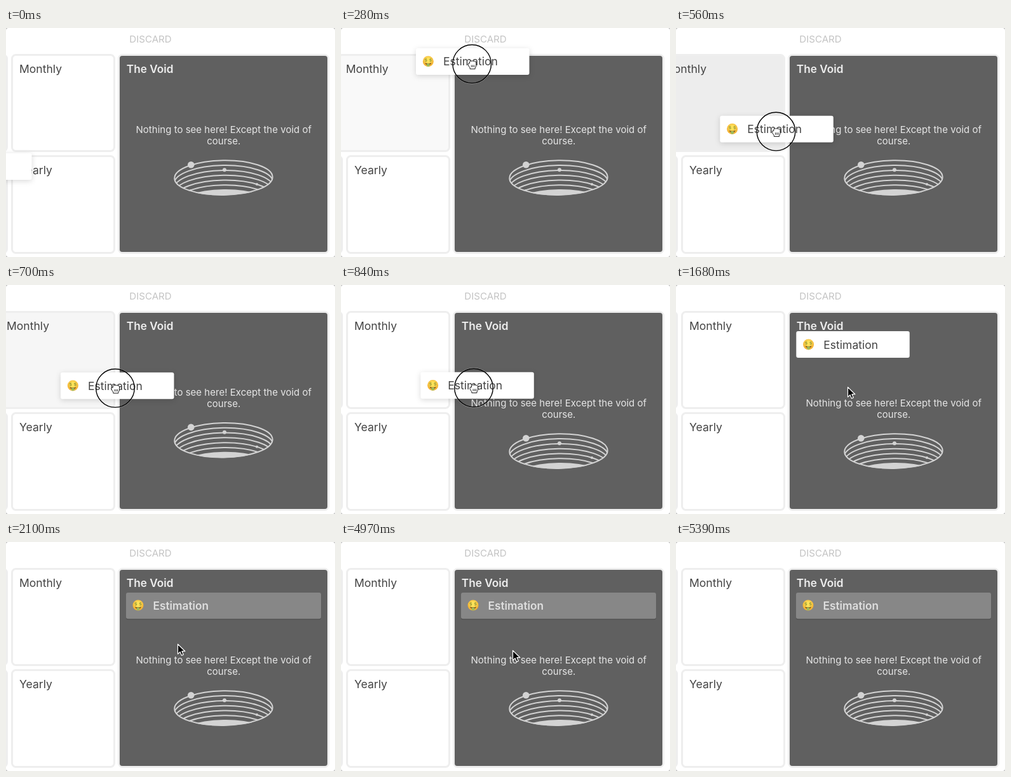
These frames come from a looping animation (518 by 362 pixels, 5.67 s). An HTML page:

```html
<!DOCTYPE html>
<html lang="en">
<head>
<meta charset="utf-8">
<title>Drag to the void</title>
<style>
  html, body { margin: 0; width: 100%; height: 100%; overflow: hidden; background: #bbb; }
  svg { display: block; width: 518px; height: 362px; font: 17.55px Inter, sans-serif; }
  .box { fill: #fff; stroke: #eee; stroke-width: 3; }
  .label { fill: #444; }
  .bold { font-weight: 600; font-size: 17.25px; }
  .rings { fill: none; stroke: #d3d3d3; stroke-width: 2; }
  #card { filter: drop-shadow(0 2px 4px rgba(0, 0, 0, .15)); }
</style>
</head>
<body>
<svg viewBox="0 0 518 362">
  <defs>
    <clipPath id="rim"><ellipse cx="342.5" cy="236" rx="78" ry="28"/></clipPath>
    <radialGradient id="skin" cy=".4">
      <stop offset=".4" stop-color="#fde25a"/><stop offset="1" stop-color="#f3b233"/>
    </radialGradient>
    <g id="face">
      <circle r="8.5" fill="url(#skin)"/>
      <path d="M-2.2-3.8q-2.8-.8-2.8.6t1.4 1 1.4 1.2-2.8.6M5-3.8q-2.8-.8-2.8.6t1.4 1 1.4 1.2-2.8.6"
            fill="none" stroke="#8a8f2c"/>
      <path d="M-5 2.2Q0 4 5 2.2 4 6 0 6T-5 2.2" fill="#8a5a1c"/>
      <path d="M-2.2 3.4h4.4v4q-2.2 1.4-4.4 0z" fill="#9dbb5c"/>
    </g>
  </defs>

  <rect width="518" height="362" rx="4" fill="#fff"/>
  <text x="194.3" y="23" font-size="15.1" fill="#c4c4c4">DISCARD</text>

  <rect class="box" id="left" x="-160" y="42.5" width="161.5" height="152" rx="6"/>
  <rect class="box" x="-160" y="202.5" width="161.5" height="153" rx="6"/>
  <rect class="box" id="monthly" y="42.5" height="152" rx="6"/>
  <text class="label" id="monthlyLabel" y="71">Monthly</text>
  <rect class="box" x="9.5" y="202.5" width="161" height="153" rx="6"/>
  <text class="label" x="21" y="231">Yearly</text>

  <rect class="box" x="177.5" y="42.5" width="330" height="313" rx="6"/>
  <rect x="179" y="44" width="327" height="310" rx="4" fill="#606060"/>
  <text class="bold" x="189.8" y="71" fill="#eee">The Void</text>

  <g id="empty">
    <g font-size="15.06" fill="#e6e6e6" text-anchor="middle">
      <text x="342.8" y="166">Nothing to see here! Except the void of</text>
      <text x="342.8" y="184">course.</text>
    </g>
    <g class="rings" transform="translate(0 .6) rotate(-.8 342.5 236)">
      <g id="rings" clip-path="url(#rim)"></g>
      <ellipse cx="342.5" cy="236" rx="77.2" ry="27.3"/>
    </g>
    <g fill="#d3d3d3">
      <circle cx="291.3" cy="216.2" r="5.3"/>
      <circle cx="344" cy="224.2" r="3"/>
      <circle cx="395" cy="247" r="2"/>
    </g>
  </g>

  <g id="card">
    <rect width="178.5" height="42" rx="3" fill="#fff"/>
    <use href="#face" x="19.3" y="20.8"/>
    <text class="label" x="43" y="27.4">Estimation</text>
  </g>

  <g id="dropped" transform="translate(189 80)">
    <rect y=".8" width="307" height="42" rx="3" fill="#4c4c4c"/>
    <rect width="307" height="41.5" rx="3" fill="#878787"/>
    <use href="#face" x="19" y="20"/>
    <text class="bold" x="42.5" y="27" fill="#dedede">Estimation</text>
  </g>

  <g id="grab">
    <circle r="31.2" fill="none" stroke="#fff" stroke-opacity=".45"/>
    <circle r="30.3" fill="none" stroke="#000" stroke-width="1.4"/>
    <g transform="translate(0 -.6) scale(.9)" stroke="#000" stroke-linejoin="round">
      <path d="M-3.5 9.5v-2Q-6.5 4-6.8 1.5T-4-.5V-3.5q1-2 2.7-.5 1.3-2 3 0 1.7-1.4 3 .4 2-.8 2.6 1.2V3q0 2.5-1.8 4.8v1.7z"
            fill="#fff"/>
      <path d="M-1 2.5v4M1.5 2.5v4M4 2.5v4" stroke-width=".9"/>
    </g>
  </g>

  <path id="arrow" d="M0 0V15.6L3.6 12.2 6 17.8 8.8 16.6 6.4 11.2H11.4Z"
        fill="#000" stroke="#fff" stroke-width="1.2" stroke-linejoin="round"/>
</svg>

<script>
const LOOP = 5670, STEP = 70, RELEASE = 1610, SETTLE = 2100;
const el = id => document.getElementById(id);

// Piecewise linear track of [time, value] pairs, held at both ends.
function track(t, keys) {
  const i = keys.findIndex(k => k[0] > t);
  if (i === 0) return keys[0][1];
  if (i < 0) return keys[keys.length - 1][1];
  const [t0, a] = keys[i - 1], [t1, b] = keys[i];
  return a + (b - a) * (t - t0) / (t1 - t0);
}

const cardX = [[0, -138], [140, -50], [280, 118], [350, 188], [420, 201], [490, 132], [560, 69.3],
  [630, 72], [700, 86], [840, 125.3], [980, 157], [1120, 177], [1260, 187], [1400, 189.3]];
const cardY = [[0, 198], [140, 128], [280, 32], [350, 27], [420, 60], [490, 112], [560, 138.8], [840, 137.8]];
const grip = [[560, 88.2], [840, 83.7], [1400, 82]];
const hover = [[210, 0], [420, 1], [630, 1], [770, 0]];
const gap = [[630, 0], [840, 26]];
const exit = [[4900, 0], [4970, 10], [5110, 52], [5250, 118], [5390, 210]];

const move = (id, x, y) => el(id).setAttribute('transform', `translate(${x} ${y})`);
const show = (id, on) => el(id).setAttribute('visibility', on ? 'visible' : 'hidden');

for (let k = 1; k <= 6; k++) {
  const ring = document.createElementNS('http://www.w3.org/2000/svg', 'ellipse');
  const shape = { cx: 342.5, cy: 236.7 + 7.8 * k, rx: 78, ry: 28, fill: k === 6 ? '#d3d3d3' : 'none' };
  for (const name in shape) ring.setAttribute(name, shape[name]);
  el('rings').append(ring);
}

function draw(now) {
  const t = Math.floor(now % LOOP / STEP) * STEP;
  const released = t >= RELEASE;

  const h = track(t, hover), shift = 40 * h, shade = 255 - 18 * h;
  move('left', -shift, 0);
  el('monthly').setAttribute('x', 9.5 - shift);
  el('monthly').setAttribute('width', 161 + shift);
  el('monthly').style.fill = `rgb(${shade},${shade},${shade})`;
  el('monthlyLabel').setAttribute('x', 21 - shift);
  move('empty', 0, track(t, gap));

  const x = track(t, cardX);
  const y = released ? 58 + 80 * Math.exp((1580 - t) / 60) : track(t, cardY);
  move('card', x, y);
  el('card').style.filter = released ? 'none' : '';
  show('card', t < SETTLE);
  show('dropped', t >= SETTLE);

  move('grab', x + track(t, grip), y + 24.8);
  show('grab', !released);
  move('arrow', 270.5, 161.5 + track(t, exit));
  show('arrow', released);
}

const start = performance.now();
function tick() {
  draw(performance.now() - start);
  requestAnimationFrame(tick);
}
tick();
</script>
</body>
</html>
```
